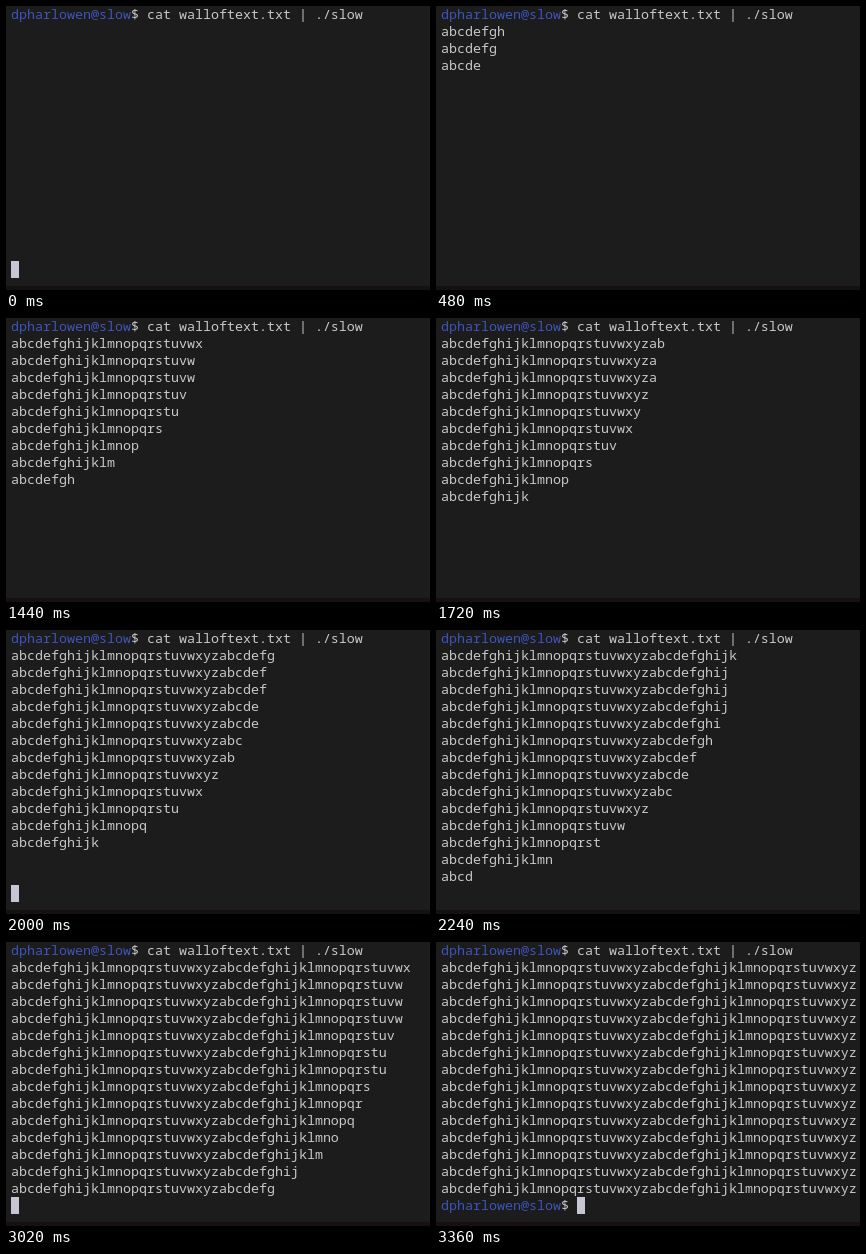
Write an HTML page that moves like this. It is 424 by 284 pixels and loops after 3.42 s.

```html
<!DOCTYPE html>
<html lang="en">
<head>
<meta charset="utf-8">
<title>Slow terminal</title>
<style>
  html, body { margin: 0; width: 100%; height: 100%; overflow: hidden; background: #1c1c1c; }
  svg { display: block; width: 424px; height: 284px; }
  text { font: 13.3333px "Noto Sans Mono", "Liberation Mono", monospace; fill: #c8c8c8; white-space: pre; }
  .user { fill: #3d55b8; }
</style>
</head>
<body>
<svg viewBox="0 0 424 284">
  <rect width="424" height="284" fill="#1c1c1c"/>
  <rect y="280" width="424" height="4" fill="#171013"/>
  <rect id="cursor" x="5" y="255" width="8" height="17" fill="#c5c5d3"/>
</svg>
<script>
const LOOP = 3420, STEP = 60, DONE = 3240;
const BLINK_START = 240, BLINK = 500;
const ROWS = 14, CHAR = 8, LINE = 17, LEFT = 5, BASE = 13;
const alphabet = "abcdefghijklmnopqrstuvwxyz";
const wall = alphabet + alphabet;

const svg = document.querySelector("svg");
const cursor = document.getElementById("cursor");

function addLine(row) {
  const line = document.createElementNS("http://www.w3.org/2000/svg", "text");
  line.setAttribute("x", LEFT);
  line.setAttribute("y", BASE + LINE * row);
  svg.append(line);
  return line;
}

function addPrompt(row, command) {
  const line = addLine(row);
  const user = document.createElementNS("http://www.w3.org/2000/svg", "tspan");
  user.setAttribute("class", "user");
  user.textContent = "dpharlowen@slow";
  line.append(user, "$ " + command);
  return line;
}

addPrompt(0, "cat walloftext.txt | ./slow");
const rows = Array.from({ length: ROWS }, (_, i) => addLine(i + 1));
const endPrompt = addPrompt(ROWS + 1, "");

// The text is revealed inside an ellipse growing from the top left corner.
function rowLength(row, radius) {
  return Math.floor(Math.sqrt(Math.max(0, radius * radius - 8 * row * row)));
}

function draw(now) {
  const t = now % LOOP;
  const done = t >= DONE;
  const radius = Math.floor(t / STEP);
  rows.forEach((line, i) => {
    line.textContent = done ? wall : wall.slice(0, rowLength(i, radius));
  });
  const blinkOff = Math.floor((t - BLINK_START) / BLINK) % 2 === 0;
  endPrompt.style.display = done ? "" : "none";
  cursor.style.display = blinkOff && !done ? "none" : "";
  cursor.setAttribute("x", LEFT + (done ? 17 * CHAR : 0));
}

let start;
function tick(now) {
  start ??= now;
  draw(now - start);
  requestAnimationFrame(tick);
}
draw(0);
requestAnimationFrame(tick);
</script>
</body>
</html>
```
